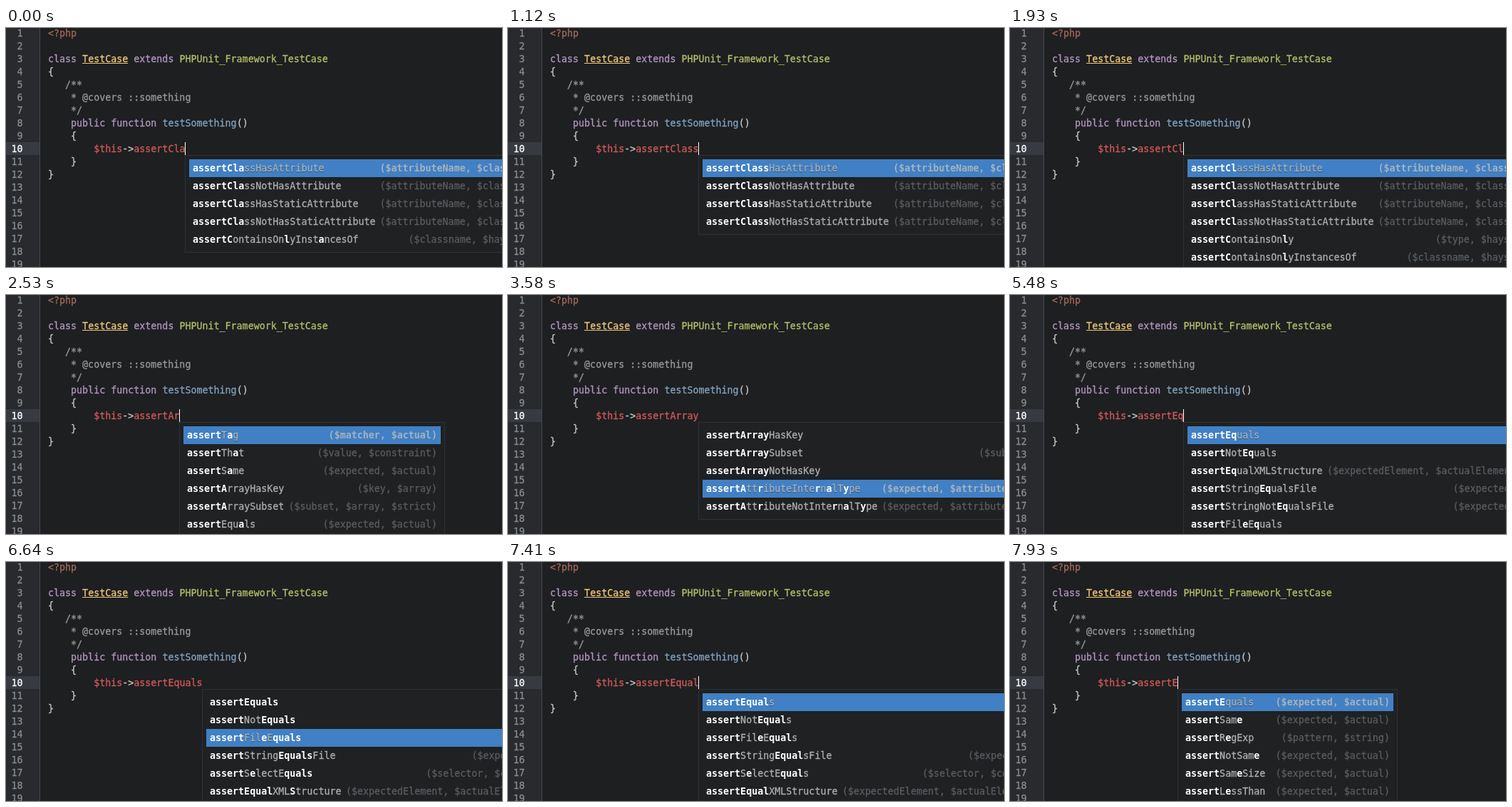
Recreate the animation shown at these times as an HTML page with a canvas. Size 696 by 335 pixels, loop 8000 ms.

```html
<!DOCTYPE html>
<html lang="en">
<head>
<meta charset="utf-8">
<title>Autocomplete</title>
<style>
  html, body { margin: 0; height: 100%; overflow: hidden; background: #1d1f21; }
  canvas { display: block; }
</style>
</head>
<body>
<canvas id="stage" width="696" height="335"></canvas>
<script>
const ctx = document.getElementById('stage').getContext('2d');
const LOOP = 8000, CHAR = 8.02, LINE = 18, ROW = 25, LEFT = 59, TOP = 178, LAG = 55;
const FONT = '13.32px "DejaVu Sans Mono", monospace';
const C = {
  bg: '#1d1f21', gutter: '#282a2e', rule: '#45484c', active: '#373b41', number: '#898c8f', white: '#ffffff',
  plain: '#c5c8c6', red: '#d0575a', green: '#b5bd68', yellow: '#f0c674', blue: '#81a2be',
  violet: '#b294bb', brown: '#a3685a', grey: '#969896',
  popup: '#1f2123', edge: '#2f3236', select: '#4180c4', label: '#acaeaf', args: '#595c5f',
  selText: '#a7b1bc', shadow: '#2b4e77'
};

// line number, column, text, colour
const code = [
  [1, 0, '<?php', C.brown],
  [3, 0, 'class', C.violet], [3, 6, 'TestCase', C.yellow], [3, 15, 'extends', C.violet],
  [3, 23, 'PHPUnit_Framework_TestCase', C.green],
  [4, 0, '{', C.plain],
  [5, 3, '/**', C.grey], [6, 4, '* @covers ::something', C.grey], [7, 4, '*/', C.grey],
  [8, 4, 'public function', C.violet], [8, 20, 'testSomething', C.blue], [8, 33, '()', C.plain],
  [9, 4, '{', C.plain],
  [10, 8, '$this', C.red], [10, 13, '->', C.plain],
  [11, 4, '}', C.plain], [12, 0, '}', C.plain]
];

const compare = '$expected, $actual', attribute = '$attributeName, $className';
const attrCompare = '$expected, $actualAttributeName, $actualClassOrObject';
const attrType = '$expected, $attributeName, $classOrObject';
const fileCompare = '$expectedFile, $actualString';
const params = {
  ClassHasAttribute: attribute, ClassNotHasAttribute: attribute,
  ClassHasStaticAttribute: attribute, ClassNotHasStaticAttribute: attribute,
  ContainsOnlyInstancesOf: '$classname, $haystack',
  ContainsOnly: '$type, $haystack', Contains: '$needle, $haystack', NotContains: '$needle, $haystack',
  Count: '$expectedCount, $haystack', NotCount: '$expectedCount, $haystack',
  Tag: '$matcher, $actual', That: '$value, $constraint', True: '$condition', Null: '$actual',
  ArrayHasKey: '$key, $array', ArrayNotHasKey: '$key, $array', ArraySubset: '$subset, $array, $strict',
  AttributeGreaterThan: attrCompare, AttributeLessThanOrEqual: attrCompare,
  AttributeInternalType: attrType, AttributeNotInternalType: attrType,
  EqualXMLStructure: '$expectedElement, $actualElement, $checkAttributes',
  StringEqualsFile: fileCompare, StringNotEqualsFile: fileCompare,
  SelectEquals: '$selector, $content, $count, $actual', RegExp: '$pattern, $string'
};

const words = s => s.split(' ');
const lists = {
  '': words('Tag True Same Null That Equals'),
  C: words('Count Contains NotCount NotContains ContainsOnly ClassHasAttribute'),
  Cl: words('ClassHasAttribute ClassNotHasAttribute ClassHasStaticAttribute ClassNotHasStaticAttribute ContainsOnly ContainsOnlyInstancesOf'),
  A: words('Tag That Same ArrayHasKey ArraySubset Equals'),
  Ar: words('ArrayHasKey ArraySubset ArrayNotHasKey AttributeGreaterThan AttributeInternalType AttributeLessThanOrEqual'),
  Array: words('ArrayHasKey ArraySubset ArrayNotHasKey AttributeInternalType AttributeNotInternalType'),
  E: words('Equals Same RegExp NotSame SameSize LessThan NotEquals'),
  Eq: words('Equals NotEquals EqualXMLStructure StringEqualsFile StringNotEqualsFile FileEquals'),
  Equal: words('Equals NotEquals FileEquals StringEqualsFile SelectEquals EqualXMLStructure')
};
lists.Cla = lists.Clas = [...lists.Cl.slice(0, 4), 'ContainsOnlyInstancesOf'];
lists.Class = lists.Cl.slice(0, 4);
lists.Arr = lists.Arra = lists.Ar;
lists.Equ = lists.Equa = lists.Eq;
lists.Equals = lists.Equal;

// time, text typed after "assert"
const edits = [
  [-700, 'Cl'], [-120, 'Cla'], [60, 'Clas'], [240, 'Class'],
  [1470, 'Clas'], [1650, 'Cla'], [1830, 'Cl'], [2000, 'C'], [2170, ''],
  [2350, 'A'], [2530, 'Ar'], [2700, 'Arr'], [2820, 'Arra'], [2930, 'Array'],
  [4230, 'Arra'], [4410, 'Arr'], [4590, 'Ar'], [4770, 'A'], [4950, ''],
  [5250, 'E'], [5420, 'Eq'], [5530, 'Equ'], [5650, 'Equa'], [5770, 'Equal'], [5880, 'Equals'],
  [7300, 'Equal'], [7450, 'Equa'], [7590, 'Equ'], [7730, 'Eq'], [7870, 'E']
];
// time, selected row
const picks = [
  [-700, 0], [460, 1], [640, 2], [730, 3], [820, 2], [1000, 1], [1120, 0],
  [3290, 1], [3440, 2], [3580, 3], [3750, 2], [3870, 1], [4050, 0],
  [6110, 1], [6290, 2], [6400, 3], [6640, 2], [6820, 1], [7000, 0]
];
const latest = (events, t) => events.filter(e => e[0] <= t).pop();

function rect(x, y, w, h, color) {
  ctx.fillStyle = color;
  ctx.fillRect(x, y, w, h);
}

// A thin stroke gives the slightly heavy look of smoothed text
function text(s, x, y, color, bold) {
  ctx.font = (bold ? 'bold ' : '') + FONT;
  ctx.fillStyle = ctx.strokeStyle = color;
  ctx.lineWidth = 0.3;
  ctx.fillText(s, x, y);
  if (!bold) ctx.strokeText(s, x, y);
}

const baseline = line => line * LINE - 6;
const column = col => LEFT + col * CHAR;

function drawEditor() {
  rect(0, 0, 696, 335, C.bg);
  rect(0, 0, 47, 335, C.gutter);
  rect(0, 160, 47, LINE, C.active);
  rect(47, 0, 1, 335, C.rule);
  for (let n = 1; n <= 19; n++) {
    text(String(n).padStart(2), 7.5, baseline(n), n === 10 ? C.white : C.number);
  }
  for (const [line, col, s, color] of code) text(s, column(col), baseline(line), color);
  rect(107, 49, 8 * CHAR, 1, C.yellow);
}

// Letters of the query found in order are bold
function drawLabel(name, query, x, y, on) {
  text('assert', x, y, C.white, true);
  let hit = 0;
  [...name].forEach((ch, i) => {
    const match = hit < query.length && ch.toLowerCase() === query[hit].toLowerCase();
    const cx = x + (6 + i) * CHAR;
    if (match) hit++;
    else if (on) text(ch, cx, y + 1, C.shadow);
    text(ch, cx, y, match ? C.white : on ? C.selText : C.label, match);
  });
}

function drawPopup(left, query, selected) {
  const rows = lists[query].map(name => [name, `(${params[name] || compare})`]);
  const chars = Math.max(...rows.map(([name, args]) => 6 + name.length + args.length));
  const x = left + 11, right = Math.round(x + chars * CHAR + 6);
  const width = right + 11 - left, height = rows.length * ROW + 12;
  rect(left, TOP, width, height, C.edge);
  rect(left + 1, TOP + 1, width - 2, height - 2, C.popup);
  rows.forEach(([name, args], i) => {
    const y = TOP + 6 + i * ROW, on = i === selected;
    if (on) rect(left + 6, y, width - 12, ROW, C.select);
    drawLabel(name, query, x, y + 17, on);
    text(args, right - args.length * CHAR, y + 17, on ? C.selText : C.args, on);
  });
}

function draw(t) {
  const [time, typed] = latest(edits, t);
  const query = latest(edits, t - LAG)[1];
  const caret = Math.floor(column(21 + typed.length));
  const idle = t - time - 450;
  drawEditor();
  text('assert' + typed, column(15), baseline(10), C.red);
  drawPopup(caret, query, latest(picks, t)[1]);
  if (idle < 0 || idle % 800 >= 400) rect(caret, 160, 1, LINE, C.white);
}

function frame() {
  draw(performance.now() % LOOP);
  requestAnimationFrame(frame);
}
frame();
</script>
</body>
</html>
```
